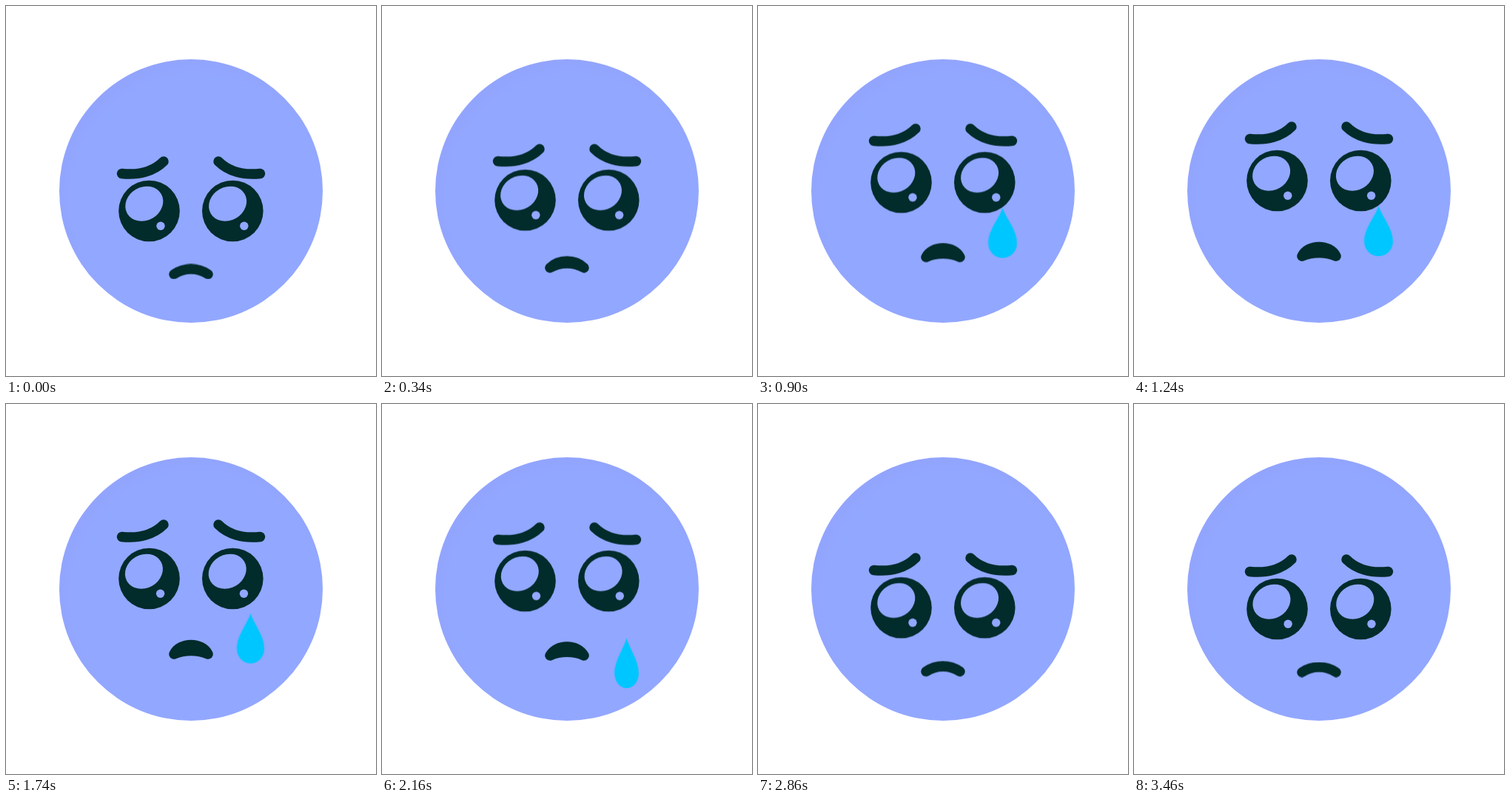
These frames come from a looping animation (500x500 px, 3.48 s). An HTML page:

```html
<!DOCTYPE html>
<html lang="en">
<head>
<meta charset="utf-8">
<title>Sad face</title>
<style>
  html, body { margin: 0; width: 100%; height: 100%; overflow: hidden; background: #fff; }
  svg { display: block; width: 100vw; height: 100vh; }

  .brows, .eyes, .mouth, .slide, .drop { animation: lift 3480ms infinite; }
  .brows { --up: -47px; }
  .eyes { --up: -41px; }
  .mouth { --up: -24.5px; }
  .slide { animation-name: slide; }
  .drop { animation-name: drop; }
  .lips { animation: lips 3480ms infinite; d: path("M-23 0C-9 -9.3 9 -9.3 23 0C9 -9.3 -9 -9.3 -23 0Z"); }

  @keyframes lift {
    0% { transform: translateY(0); animation-timing-function: cubic-bezier(.33, 0, .2, 1); }
    36.8% { transform: translateY(var(--up)); animation-timing-function: linear; }
    58.6% { transform: translateY(var(--up)); animation-timing-function: cubic-bezier(.23, 0, .454, 1); }
    87.7%, 100% { transform: translateY(0); }
  }
  @keyframes lips {
    0% { d: path("M-23 0C-9 -9.3 9 -9.3 23 0C9 -9.3 -9 -9.3 -23 0Z"); animation-timing-function: cubic-bezier(.33, 0, .2, 1); }
    36.8% { d: path("M-23 0C-15 -16.7 15 -16.7 23 0C9 -6 -9 -6 -23 0Z"); animation-timing-function: linear; }
    58.6% { d: path("M-23 0C-15 -16.7 15 -16.7 23 0C9 -6 -9 -6 -23 0Z"); animation-timing-function: cubic-bezier(.23, 0, .454, 1); }
    87.7%, 100% { d: path("M-23 0C-9 -9.3 9 -9.3 23 0C9 -9.3 -9 -9.3 -23 0Z"); }
  }
  @keyframes slide {
    0% { transform: translateY(0); animation-timing-function: cubic-bezier(.33, 0, .2, 1); }
    36.8% { transform: translateY(-41px); animation-timing-function: cubic-bezier(.333, 0, .667, .333); }
    72.4%, 100% { transform: translateY(50px); }
  }
  @keyframes drop {
    0%, 9.2% { transform: scale(0); opacity: 1; animation-timing-function: cubic-bezier(.33, 0, .67, 1); }
    25.9% { transform: scale(1); animation-timing-function: linear; }
    36.8% { transform: scale(1); animation-timing-function: cubic-bezier(.333, 0, .667, .333); }
    62.1% { transform: scale(.84, 1); animation-timing-function: linear; }
    67% { transform: scale(.76, 1); opacity: 1; animation-timing-function: linear; }
    72.4%, 100% { transform: scale(.66, 1); opacity: 0; }
  }
</style>
</head>
<body>
<svg viewBox="0 0 500 500">
  <defs>
    <radialGradient id="skin" gradientUnits="userSpaceOnUse" cx="258" cy="262" r="192">
      <stop offset=".88" stop-color="#92a7ff"/>
      <stop offset="1" stop-color="#92a4fd"/>
    </radialGradient>
    <path id="brow" d="M156.5 226.5C180 229 200 223 213 210"/>
    <g id="shine">
      <ellipse cx="-7.3" cy="-9.8" rx="26.5" ry="22.5" transform="rotate(-30 -7.3 -9.8)"/>
      <circle cx="14.9" cy="20.3" r="5.7"/>
    </g>
  </defs>

  <circle cx="250" cy="250" r="178" fill="url(#skin)"/>

  <g class="brows" fill="none" stroke="#022b2b" stroke-width="13.5" stroke-linecap="round">
    <use href="#brow"/>
    <use href="#brow" transform="matrix(-1 0 0 1 500 0)"/>
  </g>

  <g class="eyes">
    <g fill="#022b2b">
      <circle cx="193.5" cy="277" r="41.3"/>
      <circle cx="306.3" cy="277" r="41.3"/>
    </g>
    <g id="glint" fill="#92a7ff">
      <use href="#shine" x="193.5" y="277"/>
      <use href="#shine" x="306.3" y="277"/>
    </g>
  </g>

  <g transform="translate(250 362.5)">
    <g class="mouth">
      <path class="lips" fill="#022b2b" stroke="#022b2b" stroke-width="13.5" stroke-linecap="round" stroke-linejoin="round"/>
    </g>
  </g>

  <g transform="translate(330.5 311)">
    <g class="slide">
      <path class="drop" fill="#00c6ff" d="M0 0C3 12 19.5 30 19.5 48A19.5 20 0 0 1-19.5 48C-19.5 30-3 12 0 0Z"/>
    </g>
  </g>
</svg>
<script>
  // The quick shimmer restarts with each loop, so it follows the main clock.
  const glint = document.getElementById('glint');
  const clock = document.querySelector('.eyes').getAnimations()[0];

  function shimmer() {
    const t = (clock.currentTime || 0) % 3480;
    const dx = 0.6 * Math.cos(t / 220 * 2 * Math.PI);
    glint.setAttribute('transform', `translate(${dx.toFixed(3)} 0)`);
    requestAnimationFrame(shimmer);
  }
  shimmer();
</script>
</body>
</html>
```
